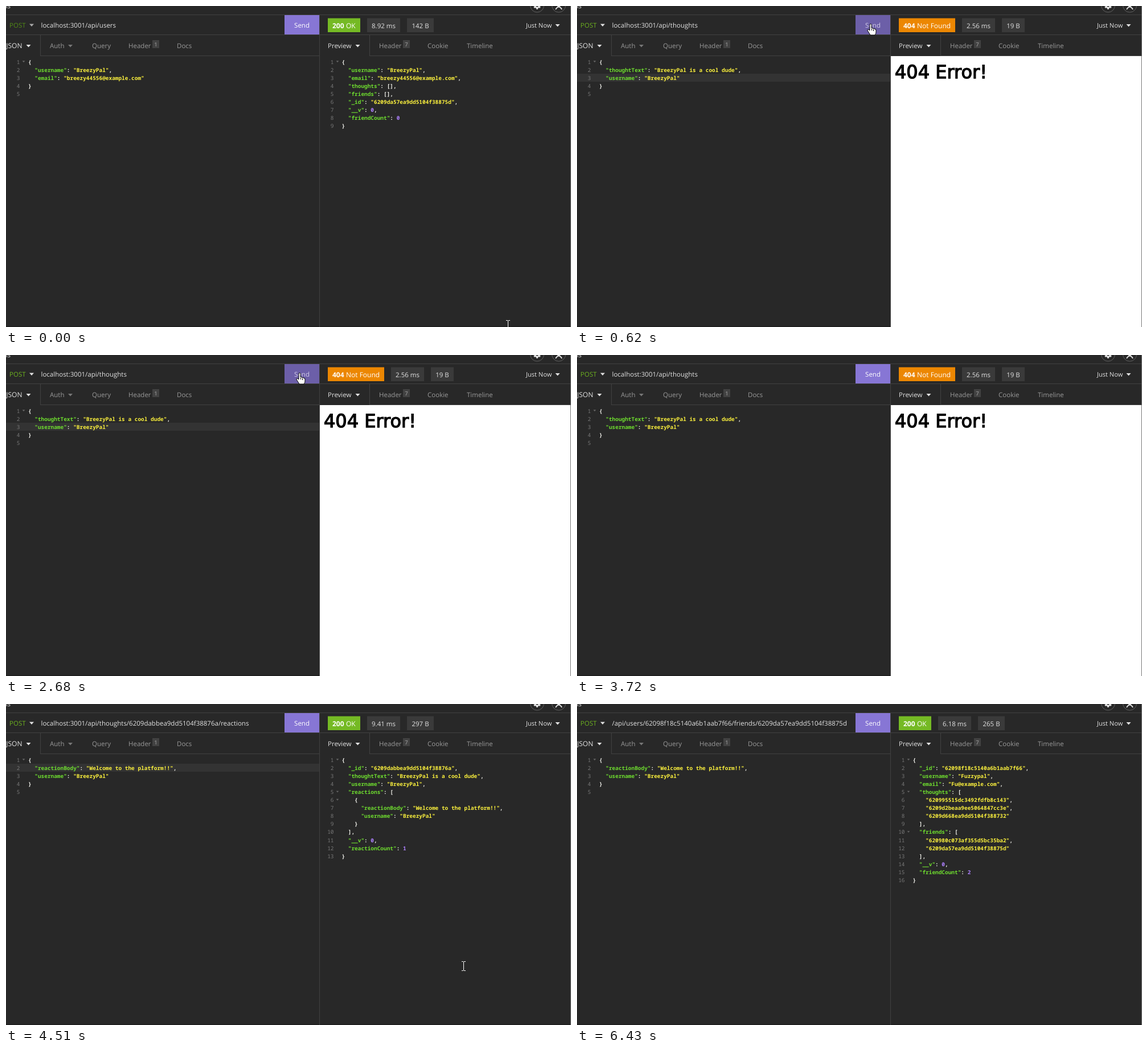
An HTML page with a canvas for the animation above (6530 ms loop, 992 by 564 pixels).

```html
<!DOCTYPE html>
<html lang="en">
<head>
<meta charset="utf-8">
<title>API client demo</title>
<style>
  html, body { margin: 0; width: 100%; height: 100%; overflow: hidden; background: #282828; }
  canvas { display: block; }
</style>
</head>
<body>
<canvas id="stage" width="992" height="564"></canvas>
<script>
const LOOP = 6530;
const UI = '"Open Sans", "Noto Sans", sans-serif';
const MONO = '600 9.45px "Noto Sans Mono", "DejaVu Sans Mono", monospace';
const NUMBERS = '9.45px "Noto Sans Mono", "DejaVu Sans Mono", monospace';
const LINE = 14.1, CODE_TOP = 91;
const LIGHT = '#e2e2e2', GREY = '#999', BORDER = '#414141', BG = '#282828';
const ctx = document.getElementById('stage').getContext('2d');
ctx.textRendering = 'geometricPrecision';

const easeOut = k => 1 - (1 - k) ** 1.5;
const easeInOut = k => k * k * (3 - 2 * k);

const thoughtBody = `{
  "thoughtText": "BreezyPal is a cool dude",
  "username": "BreezyPal"
}
`;
const reactionBody = `{
  "reactionBody": "Welcome to the platform!!",
  "username": "BreezyPal"
}
`;

// move: cursor travel between two [time, x, y] points
// caret: line, column, blink times (starts hidden) and the time the editor loses focus
const scenes = [
  {
    start: 0, dim: true, url: 'localhost:3001/api/users',
    status: '200 OK', time: '8.92 ms', size: '142 B',
    body: `{
  "username": "BreezyPal",
  "email": "breezy44556@example.com"
}
`,
    reply: `{
  "username": "BreezyPal",
  "email": "breezy44556@example.com",
  "thoughts": [],
  "friends": [],
  "_id": "6209da57ea9dd5104f38875d",
  "__v": 0,
  "friendCount": 0
}`,
    move: { from: [0, 881, 560], to: [80, 883, 572], ease: easeInOut }
  },
  {
    start: 580, url: 'localhost:3001/api/thoughts',
    status: '404 Not Found', time: '2.56 ms', size: '19 B',
    body: thoughtBody,
    caret: { line: 2, column: 11, blinks: [1100, 1660, 2190, 2680, 3220], blur: 3720 },
    move: { from: [2870, 516, 32], to: [3260, 970, 572], ease: easeInOut, waits: true }
  },
  {
    start: 3760, dim: true, url: 'localhost:3001/api/thoughts/6209da57ea9dd5104f38875d',
    status: '200 OK', time: '11.2 ms', size: '168 B',
    body: thoughtBody,
    reply: `{
  "_id": "6209da57ea9dd5104f38875d",
  "username": "BreezyPal",
  "email": "breezy44556@example.com",
  "thoughts": [
    "6209dabbea9dd5104f38876a"
  ],
  "friends": [],
  "__v": 0,
  "friendCount": 0
}`
  },
  {
    start: 4320, url: 'localhost:3001/api/thoughts/6209dabbea9dd5104f38876a/reactions',
    status: '200 OK', time: '9.41 ms', size: '297 B',
    body: reactionBody,
    reply: `{
  "_id": "6209dabbea9dd5104f38876a",
  "thoughtText": "BreezyPal is a cool dude",
  "username": "BreezyPal",
  "reactions": [
    {
      "reactionBody": "Welcome to the platform!!",
      "username": "BreezyPal"
    }
  ],
  "__v": 0,
  "reactionCount": 1
}`,
    caret: { line: 1, column: 43, blinks: [4930], blur: 5120 },
    move: { from: [4320, 650, 262], to: [4710, 890, 573], ease: easeOut }
  },
  {
    start: 5160, url: '/api/users/62098f18c5140a6b1aab7f66/friends/6209da57ea9dd5104f38875d',
    status: '200 OK', time: '6.18 ms', size: '265 B',
    body: reactionBody,
    reply: `{
  "_id": "62098f18c5140a6b1aab7f66",
  "username": "Fuzzypal",
  "email": "Fu@example.com",
  "thoughts": [
    "620995515dc3492fdfb8c143",
    "6209d2beaa9ee5064847cc3e",
    "6209d668ea9dd5104f388732"
  ],
  "friends": [
    "620980c073af355d5bc35ba2",
    "6209da57ea9dd5104f38875d"
  ],
  "__v": 0,
  "friendCount": 2
}`,
    move: { from: [5210, 650, 262], to: [5750, 892, 573], ease: easeOut }
  }
];

function rect(x, y, w, h, color) {
  ctx.fillStyle = color;
  ctx.fillRect(x, y, w, h);
}

function text(string, x, y, color = LIGHT, font = `11.5px ${UI}`, align = 'left') {
  ctx.font = font;
  ctx.textAlign = align;
  ctx.fillStyle = color;
  ctx.fillText(string, x, y);
}

function polygon(color, ...points) {
  ctx.beginPath();
  points.forEach(([x, y]) => ctx.lineTo(x, y));
  ctx.closePath();
  ctx.fillStyle = color;
  ctx.fill();
}

function arrowDown(x, y, color = LIGHT, r = 4) {
  polygon(color, [x - r, y - r / 2], [x + r, y - r / 2], [x, y + r / 2 + 0.5]);
}

function columnWidth() {
  ctx.font = MONO;
  return ctx.measureText('0').width;
}

function code(source, x, numberX) {
  const charWidth = columnWidth();
  source.split('\n').forEach((line, i) => {
    const y = CODE_TOP + i * LINE + 10.5;
    text(i + 1, numberX, y, '#777', NUMBERS, 'right');
    if (/[{[]$/.test(line)) arrowDown(numberX + 6.5, y - 4, '#666', 2.3);
    for (const { 0: token, index } of line.matchAll(/"[^"]*"|\d+|[^"\d]+/g)) {
      const isKey = line[index + token.length] === ':';
      const color = token[0] === '"' ? (isKey ? '#6edc2f' : '#fbf03d')
        : /\d/.test(token) ? '#ae81ff' : '#f8f8f2';
      text(token, x + index * charWidth, y, color, MONO);
    }
  });
}

function activeLine({ line }) {
  rect(0, Math.round(CODE_TOP + line * LINE), 550, 14, '#333');
}

function caret({ line, column, blinks }, t) {
  if (blinks.filter(time => time <= t).length % 2 === 0) return;
  rect(Math.round(39 + column * columnWidth()), Math.round(CODE_TOP + line * LINE), 1, 15, '#f8f8f0');
}

function topBar() {
  text('ns', 8, 4, LIGHT, undefined, 'right');
  ctx.lineWidth = 1;
  ctx.strokeStyle = '#606060';
  for (const x of [932.5, 970.5]) {
    ctx.beginPath();
    ctx.arc(x, -1, 12, 0, 7);
    ctx.stroke();
  }
  ctx.strokeStyle = LIGHT;
  ctx.lineWidth = 3;
  ctx.beginPath();
  ctx.arc(932.5, -0.5, 3.5, 0, 7);
  ctx.stroke();
  for (let i = 0; i < 6; i++) {
    const a = Math.PI / 6 + i * Math.PI / 3;
    ctx.beginPath();
    ctx.moveTo(932.5 + 4 * Math.cos(a), -0.5 + 4 * Math.sin(a));
    ctx.lineTo(932.5 + 6.3 * Math.cos(a), -0.5 + 6.3 * Math.sin(a));
    ctx.stroke();
  }
  ctx.lineWidth = 1.8;
  ctx.beginPath();
  ctx.arc(970.5, -3, 3.4, 0, 7);
  ctx.moveTo(965, 6);
  ctx.quadraticCurveTo(970.5, -3, 976, 6);
  ctx.stroke();
}

function countBadge(count, x) {
  rect(x, 60, 12, 14, '#424242');
  text(count, x + 6, 70.5, '#aaa', `9.5px ${UI}`, 'center');
}

function chrome(scene, hover) {
  const dim = scene.dim;
  topBar();
  text('POST', 6, 38, dim ? '#518916' : '#6cb01f');
  arrowDown(45, 33.5, dim ? '#aaa' : LIGHT);
  text(scene.url, 61.5, 37.5);
  rect(489, 16, 61, 34, hover ? '#6c5fa8' : '#8776d5');
  text('Send', 519.5, 38, hover ? '#d2cce8' : '#fff', undefined, 'center');

  const tabs = [['Auth', 77], ['Query', 151], ['Header', 215], ['Docs', 300],
    ['Header', 655], ['Cookie', 740], ['Timeline', 809]];
  tabs.forEach(([label, x]) => text(label, x, 74, GREY));
  text('JSON', 28.5, 74, LIGHT, `12px ${UI}`, 'right');
  text('Preview', 565, 74);
  arrowDown(39.5, 70);
  arrowDown(113, 70, '#777');
  arrowDown(617.5, 70);
  countBadge(1, 257);
  countBadge(7, 697);

  const failed = !scene.reply;
  const [number, ...words] = scene.status.split(' ');
  const boxes = failed ? [99, 58, 40] : [57, 58, 47];
  rect(565, 21.5, boxes[0], 24.5, failed ? '#ec8702' : '#75ba24');
  text(number, 573, 38.5, '#fff', `bold 12px ${UI}`);
  text(words.join(' '), 597, 38.5, '#fff', `500 12px ${UI}`);
  let x = 565 + boxes[0] + 12;
  [scene.time, scene.size].forEach((label, i) => {
    rect(x, 21.5, boxes[i + 1], 24.5, '#3a3a3a');
    text(label, x + boxes[i + 1] / 2, 38.5, LIGHT, undefined, 'center');
    x += boxes[i + 1] + 12;
  });
  text('Just Now', 913, 38, LIGHT, `11.1px ${UI}`);
  arrowDown(968.5, 34);

  rect(0, 15, 992, 1, BORDER);
  rect(0, 50, 992, 1, BORDER);
  rect(60, 51, 1, 36, BORDER);
  rect(60, 87, 490, 1, BORDER);
  rect(638, 51, 1, 36, BORDER);
  rect(638, 87, 353, 1, BORDER);
}

function errorPage() {
  rect(551, 88, 440, 476, '#fff');
  text('404 Error!', 558, 127, '#000', '32px "DejaVu Sans", sans-serif');
  ctx.strokeStyle = '#000';
  ctx.lineWidth = 1.3;
  ctx.strokeText('404 Error!', 558, 127);
}

function cursorAt({ from: [t0, x0, y0], to: [t1, x1, y1], ease, waits }, t) {
  if (t >= t1) return null;
  const progress = (t - t0) / (t1 - t0);
  const k = ease(waits ? Math.max(0, progress) : progress);
  return { x: x0 + (x1 - x0) * k, y: y0 + (y1 - y0) * k };
}

function drawCursor({ x, y }, kind) {
  ctx.save();
  ctx.translate(Math.round(x), Math.round(y));
  if (kind === 'beam') {
    rect(0, -7, 1, 15, '#fff');
    for (const end of [-8, 8]) {
      rect(-3, end, 3, 1, '#fff');
      rect(1, end, 3, 1, '#fff');
    }
  } else {
    const shape = new Path2D(kind === 'hand'
      ? 'M-2 1Q-2-.5-.5-.5Q1-.5 1 1V7Q3.5 5.5 4 8Q6.500 6.500 7 9Q9 8 9 10V14Q9 17 7 19H-1L-6 11Q-6 8-3 10L-2 11Z'
      : 'M0 0V16L4 12.500L6.500 18L9 17L6.500 11.500H11.500Z');
    ctx.fillStyle = '#fff';
    ctx.fill(shape);
    ctx.strokeStyle = '#000';
    ctx.lineWidth = 1;
    ctx.stroke(shape);
    if (kind === 'hand') {
      rect(1, 8, 1, 3, '#000');
      rect(4, 9, 1, 3, '#000');
    }
  }
  ctx.restore();
}

function draw() {
  const t = performance.now() % LOOP;
  const scene = scenes.findLast(s => s.start <= t);
  const cursor = scene.move && cursorAt(scene.move, t);
  const hover = cursor && cursor.x >= 489 && cursor.x < 550 && cursor.y >= 16 && cursor.y < 50;
  const focused = scene.caret && t < scene.caret.blur;

  rect(0, 0, 992, 564, BG);
  chrome(scene, hover);
  if (focused) activeLine(scene.caret);
  code(scene.body, 38.9, 24.5);
  if (focused) caret(scene.caret, t);
  rect(0, 562, 992, 2, '#202020');
  if (scene.reply) code(scene.reply, 589.4, 575.5);
  else errorPage();
  rect(550, 16, 1, 548, BORDER);
  rect(991, 0, 1, 564, '#777');
  if (cursor) {
    drawCursor(cursor, hover ? 'hand' : scene.reply && cursor.y > 88 ? 'beam' : 'arrow');
  }
  requestAnimationFrame(draw);
}
draw();
</script>
</body>
</html>
```
